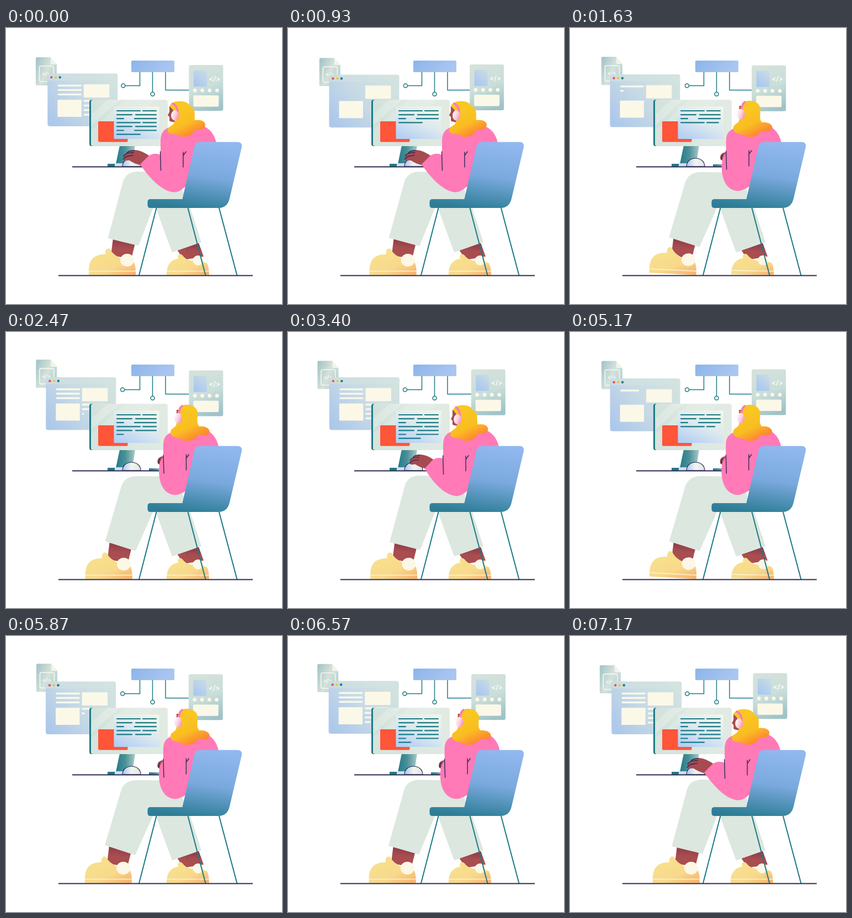
An HTML page for the animation above (7210 ms loop, 500 by 500 pixels).

```html
<!DOCTYPE html>
<html lang="en">
<head>
<meta charset="utf-8">
<title>Developer at a desk</title>
<style>
  html, body { margin: 0; width: 100%; height: 100%; overflow: hidden; background: #fff; }
  svg { display: block; width: 100%; height: 100%; }
  text { font-family: Inter, sans-serif; font-weight: 600; fill: #fff; text-anchor: middle; }
</style>
</head>
<body>
<svg viewBox="0 0 500 500" xmlns="http://www.w3.org/2000/svg">
  <defs id="defs">
    <clipPath id="paperClip"><rect x="196" y="147" width="82" height="53"/></clipPath>
  </defs>

  <g id="doc">
    <path d="M56 53H81L92 66V102Q92 104 90 104H56Q54 104 54 102V55Q54 53 56 53Z" fill="url(#docFill)"/>
    <path d="M81 53V64Q81 66 83 66H92Z" fill="#f3f4e9"/>
    <rect x="60.5" y="69" width="26" height="28" rx="3" fill="none" stroke="#f4f8f4" stroke-width="1.6"/>
    <text x="73" y="86" font-size="9">&lt;/&gt;</text>
  </g>

  <g id="win">
    <rect x="75" y="82.5" width="127" height="95.5" rx="4" fill="url(#winFill)"/>
    <path d="M79 82.5H198Q202 82.5 202 87V95H75V87Q75 82.5 79 82.5Z" fill="#d3e3e2" opacity=".55"/>
    <circle cx="82" cy="89.3" r="2.2" fill="#f4503c"/>
    <circle cx="89.8" cy="89.3" r="2.2" fill="#f2c431"/>
    <circle cx="97.5" cy="89.3" r="2.2" fill="#1d7a86"/>
    <g id="blocks" fill="#fbf8e8">
      <rect x="140.5" y="102" width="46.5" height="24" rx="1"/>
      <rect x="93" y="130" width="43.5" height="31" rx="1"/>
    </g>
    <g id="winLines" stroke="#f8f8ec" stroke-width="3.4" stroke-linecap="round"></g>
  </g>

  <g fill="none" stroke="#1d7a86" stroke-width="1.5">
    <path id="wireLeft"/>
    <circle id="node" cy="104.5" r="3.5"/>
    <path d="M265.5 80V116"/><circle cx="265.6" cy="119.8" r="3.5"/>
    <path d="M289 80V112.5H334"/>
  </g>
  <rect x="227" y="59" width="78" height="21" rx="2" fill="url(#boxFill)"/>

  <g id="card">
    <rect x="331.5" y="67" width="62" height="83" rx="3" fill="url(#cardFill)"/>
    <rect x="340" y="77" width="24" height="29" fill="url(#tileFill)"/>
    <text x="378" y="95.5" font-size="12">&lt;/&gt;</text>
    <g fill="#fbf8e8">
      <circle cx="342.3" cy="113" r="3.4"/><circle cx="355.8" cy="113" r="3.4"/>
      <circle cx="369" cy="113" r="3.4"/><circle cx="382.4" cy="113" r="3.4"/>
      <rect x="339.5" y="122" width="46" height="20.5" rx="2"/>
    </g>
  </g>

  <path d="M206 213H234L228 251H198Z" fill="url(#standFill)"/>
  <rect x="151" y="130" width="136" height="84" rx="4" fill="#1d7a86"/>
  <rect x="154" y="130" width="139" height="84" rx="4" fill="url(#monFill)"/>
  <path d="M184 130H207L155 176V156Z" fill="#fff" opacity=".2"/>
  <path d="M216 130H270L188 212H154V186Z" fill="#fff" opacity=".13"/>
  <rect x="167" y="169" width="53.5" height="37.5" rx="2" fill="#ff5539"/>
  <rect x="195.5" y="142" width="82.5" height="59" rx="2" fill="url(#paperFill)"/>
  <g clip-path="url(#paperClip)">
    <g id="code" stroke="#1d7a86" stroke-width="2.2" stroke-linecap="round"></g>
  </g>
  <rect x="184" y="246" width="14" height="5" rx="1" fill="#1d7a86"/>
  <rect x="197" y="245" width="16" height="6" fill="#cfe0ee"/>
  <rect x="259" y="247" width="22" height="4" fill="url(#standFill)"/>
  <path d="M211 251C211 231 244 231 244 251Z" fill="url(#mouseFill)" stroke="#2d2b57" stroke-width="1.2"/>
  <path d="M120 251.5H284" stroke="#2d2b57" stroke-width="2"/>

  <path d="M310 402L349 389L358 414L322 420Z" fill="url(#ankleFill)"/>
  <g id="farShoe">
    <path d="M291 447.5C290 428 301 419 312 418C309 411 315 408 319 411C326 420 335 424 350 421L364 426C367 432 368 440 368 447.5Z" fill="url(#shoeFill)"/>
    <ellipse cx="348" cy="421" rx="9.5" ry="9" fill="#fcf7e6"/>
    <path d="M291 440.5H368" stroke="#fdf4d4" stroke-width="1.5"/>
  </g>
  <path d="M266 315L273 330L301 406.5L354 388L330 315Z" fill="#dce7df"/>

  <g id="foot">
    <path d="M194 380L234 390L227 418L190 412Z" fill="url(#ankleFill)"/>
    <g id="shoe">
      <path d="M150 447.5C148 420 158 410 180 410C179 401 184 397 189 401C192 407 196 411 207 417L232 425C235 432 235 440 235 447.5Z" fill="url(#shoeFill)"/>
      <ellipse cx="219.5" cy="420.5" rx="12.5" ry="11.5" fill="#fcf7e6"/>
      <path d="M150 440.5H235" stroke="#fdf4d4" stroke-width="1.5"/>
    </g>
  </g>
  <path id="thigh" fill="#dce7df"/>

  <g id="body">
    <path id="hand" fill="#a64b50"/>
    <path id="fingers" fill="none" stroke="#2d2b57" stroke-width="1.4" stroke-linecap="round"/>
    <path id="torso" fill="#ff7ab7"/>
    <path id="folds" fill="none" stroke="#2d2b57" stroke-width="1.4" stroke-linecap="round"/>
    <path id="face" fill="#a64b50"/>
    <path id="hair" fill="url(#hairFill)"/>
    <path id="band" fill="none" stroke="#ff7ab7" stroke-width="4" stroke-linecap="round"/>
    <ellipse id="cup" rx="7" ry="9.2" fill="url(#cupFill)"/>
  </g>

  <path d="M350 206.5H420Q428.500 207 427 216L405 309Q401 326 385 326H262Q256.500 326 256.500 321V315Q256.500 310 262 310H319.500L341.500 214Q344 206.500 350 206.500Z" fill="url(#chairFill)"/>
  <path d="M272.500 326L241 448M329.500 326L361.500 448M386 326L418.500 448" stroke="#1d7a86" stroke-width="2"/>
  <path d="M95 448.500H447" stroke="#2d2b57" stroke-width="2"/>
</svg>

<script>
const PERIOD = 3605;
const el = id => document.getElementById(id);
const set = (node, attrs) => { for (const k in attrs) node.setAttribute(k, attrs[k]); };
const make = (tag, parent, attrs = {}) => {
  const node = document.createElementNS('http://www.w3.org/2000/svg', tag);
  set(node, attrs);
  return parent.appendChild(node);
};

// id: direction [x1, y1, x2, y2], then evenly spaced colours
const gradients = {
  docFill: [[0, .2, 1, .8], '#a8c6c9', '#d5e2da', '#b4cfd2'],
  winFill: [[0, .8, 1, .2], '#adc8ea', '#c8dae5', '#d2e3df'],
  boxFill: [[0, 0, 1, .3], '#8db4ea', '#a9c6f0'],
  cardFill: [[.3, 0, .6, 1], '#d4e2da', '#cbdeda', '#9fc3c8'],
  tileFill: [[.2, 1, .9, 0], '#a9c6f2', '#c9dce4'],
  standFill: [[0, .5, 1, .5], '#21798a', '#4b9199', '#a9cbc8'],
  monFill: [[0, .5, 1, .3], '#cfe0d9', '#dde8e0', '#e2ebe3'],
  paperFill: [[.2, 1, .8, 0], '#b4cff5', '#dce9ee', '#f1f4e9'],
  mouseFill: [[0, .5, 1, .5], '#a9c6f0', '#f2f5ee', '#dbe7e4'],
  ankleFill: [[.5, 0, .4, 1], '#853a46', '#a94d50', '#aa4e50'],
  shoeFill: [[.35, .2, 1, 1], '#f7df8d', '#f8d98a', '#f9ad68'],
  hairFill: [[.35, .2, .75, 1], '#f9c722', '#f9bd22', '#ff7635'],
  cupFill: [[.2, .3, 1, .7], '#fbeef0', '#f9c9dc', '#f987bb'],
  chairFill: [[.6, 0, .4, 1], '#90b8ef', '#7aa9de', '#2d7d96']
};
for (const [id, [[x1, y1, x2, y2], ...colors]] of Object.entries(gradients)) {
  const g = make('linearGradient', el('defs'), { id, x1, y1, x2, y2 });
  colors.forEach((c, i) => make('stop', g, { offset: i / (colors.length - 1), 'stop-color': c }));
}

const clamp = x => Math.max(0, Math.min(1, x));
const ease = (t, from, to) => { const x = clamp((t - from) / (to - from)); return x * x * (3 - 2 * x); };
const wave = (t, peak) => Math.cos(2 * Math.PI * (t - peak) / PERIOD);
const lerp = (a, b, k) => a + (b - a) * k;
const move = (id, x, y) => el(id).setAttribute('transform', `translate(${x} ${y})`);
function keyed(t, keys) {
  let [t0, v0] = keys[0];
  for (const [t1, v1] of keys) {
    if (t < t1) return lerp(v0, v1, clamp((t - t0) / (t1 - t0)));
    [t0, v0] = [t1, v1];
  }
  return v0;
}
function morph(id, [a, b], k) {
  const target = b.match(/[\d.]+/g);
  let i = 0;
  el(id).setAttribute('d', a.replace(/[\d.]+/g, n => lerp(+n, +target[i++], k).toFixed(2)));
}

// Pairs of matching paths: typing pose, leaning-back pose
const poses = {
  torso: [
    'M296 180C284 184 280 192 280 205L280 230C272 226 263 228 258 232L243 247C256 266 277 292 300 297C308 299 316 295 324 288L380 260L381 208C378 192 368 180 352 176Z',
    'M302 181C289 185 285 193 285 205L285 226C281 230 279 234 278 240L277 250C277 276 287 293 304 295C313 296 320 291 326 288L380 260L385 207C381 190 372 180 358 176Z'],
  hand: [
    'M260 232C249 224 236 219 227 222C218 225 210 235 213 239C216 242 220 239 224 240C231 245 238 247 246 249Z',
    'M286 225C281 225 277 227 275 231C274 234 274 237 276 239C277 240 278 240 279 240C280 240 281 240 284 240Z'],
  fingers: [
    'M212 238C215 233 221 231 230 231M213 232C217 226 223 225 231 226M219 226C223 222 227 222 232 222',
    'M276 238C276 237 277 236 278 236M276 235C277 233 277 233 278 233M277 231C278 230 278 230 279 230'],
  folds: [
    'M279.500 224L280.500 258M321 252L321 225M321 231L326 224',
    'M285 223L286 256M326.500 250L326.500 222M327 228L331.500 222'],
  face: [
    'M296 141L307 143L306 171L297 169C295 166 297 163 296 161L293 158L296 152Z',
    'M309 141L316 141L316 165L309 164C308 162 308 160 308 158L308 155L309 149Z'],
  hair: [
    'M296 142C299 130 328 129 333 141C345 146 341 158 342 167C350 165 361 168 361 175C361 183 352 186 343 184C340 196 320 202 311 193C304 193 292 192 293 184C294 177 304 178 305 170C309 160 305 148 296 142Z',
    'M316 136C322 129 344 130 347 145C348 155 344 164 350 171C360 170 368 174 369 180C368 188 357 188 350 186C343 197 326 201 318 194C310 192 297 190 298 181C299 173 308 174 309 166C310 155 308 146 316 136Z'],
  band: [
    'M302 137C307 139 311 145 311 153',
    'M319 134C315 137 313 143 313 150']
};
const thigh = [
  'M212 278C216 266 225 260 240 260L310 262L325 310L268 322L240 394.500L184.500 381Z',
  'M209 278C214 266 223 261 239 261L310 262L325 310L268 322L234 397L179 379Z'];

const rowPattern = [[[201, 243], [248, 272]], [[201, 228], [235, 272]], [[201, 213], [233, 272]]];
const codeSegments = Array.from({ length: 7 }, (_, row) =>
  rowPattern[row % 3].map(([x1, x2]) => ({ row, x1, x2, line: make('line', el('code')) }))).flat();
const winRows = Array.from({ length: 7 }, (_, i) => ({
  x: i < 3 ? 95 : 142, y: i < 3 ? 104.3 + 8 * i : 132 + 8.3 * (i - 3), line: make('line', el('winLines'))
}));
const blocks = [...el('blocks').children].map(node => ({ node, h: +node.getAttribute('height') }));

function drawCode(t) {
  const scroll = 21 * ease(t, 30, 500);
  const typed = t < 600 ? 6.6 : keyed(t, [[1100, 3.6], [1565, 3.86], [2470, 5.16], [2965, 6.3], [3500, 6.6]]);
  const shift = t < 600 ? scroll : 0;
  for (const { row, x1, x2, line } of codeSegments) {
    const end = Math.min(x2, 201 + 71 * clamp(typed - row));
    const y = 150 + 7.1 * row - shift * 7.1 / 7;
    set(line, { x1, x2: end, y1: y, y2: y, opacity: end > x1 ? 1 : 0 });
  }
}

function drawWindow(t) {
  const enter = ease(t, 320, 760);
  const leaving = t < 300;
  const fade = 1 - ease(t, 40, 300);
  blocks.forEach(({ node, h }) => set(node, { height: leaving ? h : h * (.7 + .3 * enter) }));
  move('blocks', 0, leaving ? -8 * (1 - fade) : 13 * (1 - enter));
  el('blocks').setAttribute('opacity', leaving ? fade : clamp(enter * 2.5));
  const typed = leaving ? 7 : keyed(t, [[1400, 0], [2470, 5], [3300, 7]]);
  el('winLines').setAttribute('opacity', leaving ? fade : 1);
  winRows.forEach(({ x, y, line }, i) => {
    const k = clamp(typed - i);
    set(line, { x1: x, x2: x + 40 * k, y1: y, y2: y, opacity: k > 0 ? 1 : 0 });
  });
}

function drawPerson(t) {
  const turn = ease(t, 1000, 1500) - ease(t, 3050, 3500);
  for (const id in poses) morph(id, poses[id], turn);
  set(el('cup'), { cx: lerp(306, 312, turn), cy: lerp(158.5, 156, turn) });
  move('body', 1.5 - 3 * wave(t, 600) - 4.5 * turn, 0);

  const back = .5 + .55 * wave(t, 2020);
  morph('thigh', thigh, back);
  move('foot', -7 * back, 0);
  const tap = ease(t, 1250, 1565) - ease(t, 1565, 1900);
  el('shoe').setAttribute('transform', `rotate(${3.2 * tap} 235 447.5)`);
  el('farShoe').setAttribute('transform', `translate(${1.5 * tap} 0) rotate(${tap} 368 447.5)`);
}

function draw(time) {
  const t = time % PERIOD;
  move('doc', 1.2 + 2 * wave(t, 1300), -.7 + 2.2 * wave(t, 700));
  move('win', -1.3 + 1.8 * wave(t, 280), .6 + 1.6 * wave(t, 1100));
  move('card', -1 - 1.6 * wave(t, 1250), .7 - 1.8 * wave(t, 700));
  const nodeX = 212 + .9 * wave(t, 700);
  set(el('node'), { cx: nodeX });
  set(el('wireLeft'), { d: `M242.500 80V104.500H${nodeX + 3.5}` });
  drawCode(t);
  drawWindow(t);
  drawPerson(t);
}

const start = performance.now();
function tick() {
  draw(performance.now() - start);
  requestAnimationFrame(tick);
}
tick();
</script>
</body>
</html>
```
